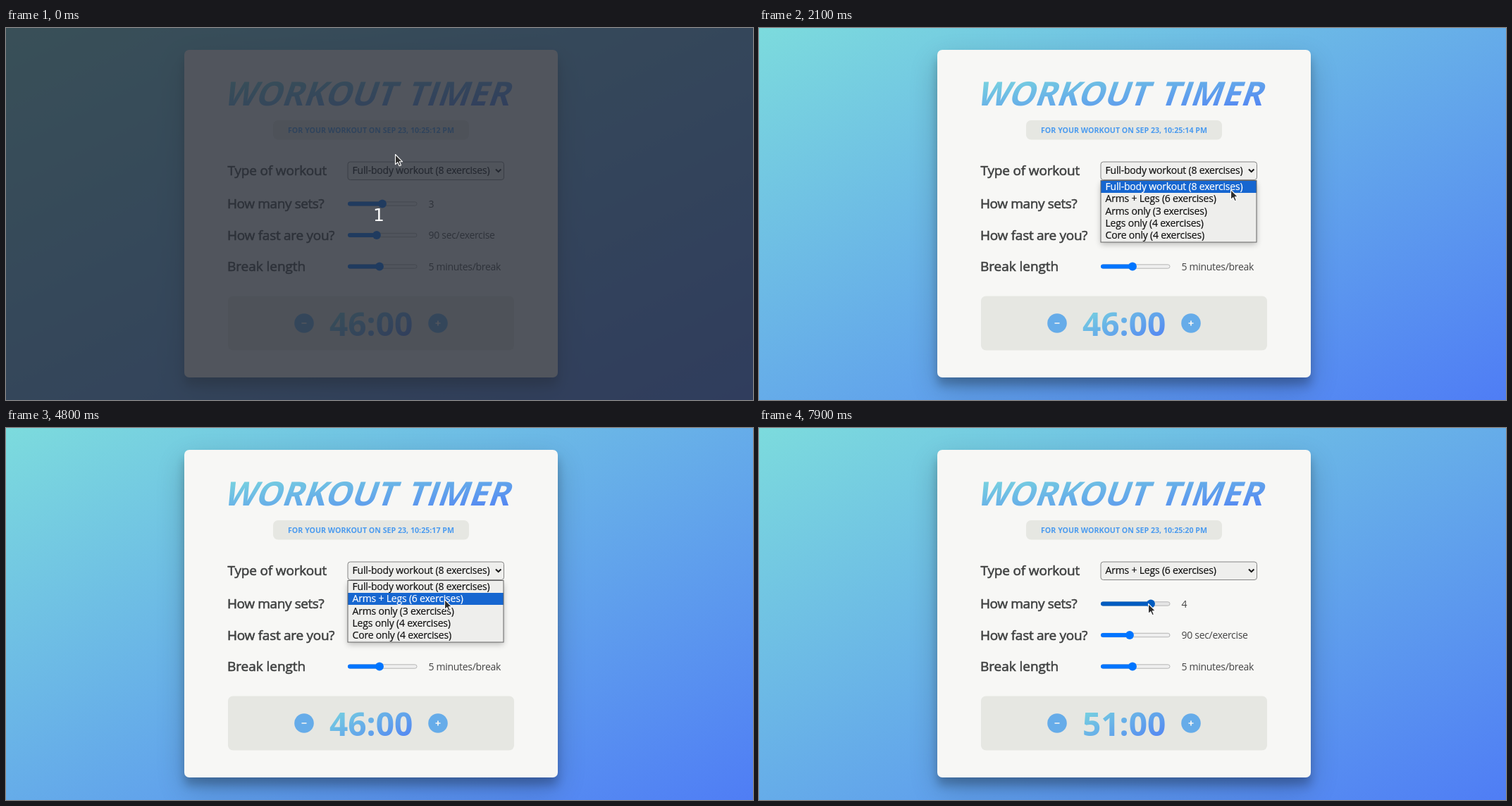
An HTML page for the animation above (8 s loop, 1060 by 528 pixels).

```html
<!DOCTYPE html>
<html lang="en">
<head>
<meta charset="utf-8">
<title>Workout timer</title>
<style>
  html, body { margin: 0; width: 100%; height: 100%; overflow: hidden; }
  svg { display: block; width: 1060px; height: 528px; font-family: "Open Sans", "Noto Sans", sans-serif; }
  text { white-space: pre; }
  .big { font-weight: 700; font-size: 47px; }
  .label { font-size: 19px; fill: #404242; stroke: #404242; stroke-width: .6px; }
  .value { font-size: 14px; fill: #444; letter-spacing: -.3px; }
  .option { font-size: 14px; letter-spacing: -.19px; }
  .date { font-weight: 700; font-size: 10.65px; fill: #4b9bef; text-anchor: middle; }
  .card { fill: #f7f7f5; filter: drop-shadow(0 0 0 transparent); }
</style>
</head>
<body>
<svg viewBox="0 0 1060 528">
  <defs>
    <linearGradient id="sky" x1="0" y1="0" x2="1" y2="1">
      <stop stop-color="#7cdbdd"/><stop offset="1" stop-color="#4f7df5"/>
    </linearGradient>
    <linearGradient id="titleInk" href="#sky" gradientUnits="userSpaceOnUse"
      gradientTransform="translate(309 -47) scale(406 60)"/>
    <linearGradient id="timeInk" href="#sky" gradientUnits="userSpaceOnUse"
      gradientTransform="translate(459 391) scale(118 58)"/>
    <filter id="wide" x="-30%" y="-30%" width="160%" height="160%"><feGaussianBlur stdDeviation="20"/></filter>
    <filter id="near" x="-30%" y="-30%" width="160%" height="160%"><feGaussianBlur stdDeviation="6.5"/></filter>
    <filter id="soft" x="-20%" y="-20%" width="140%" height="150%"><feGaussianBlur stdDeviation="4"/></filter>
  </defs>
  <rect width="1060" height="528" fill="url(#sky)"/>
  <rect x="253" y="47" width="530" height="465" rx="7" opacity=".2" filter="url(#wide)"/>
  <rect x="253" y="42" width="530" height="465" rx="7" opacity=".22" filter="url(#near)"/>
  <rect x="253" y="31" width="530" height="465" rx="7" fill="#f7f7f5"/>
  <g class="big" fill="url(#titleInk)" transform="translate(0 110) skewX(-19)">
    <text x="307.5" letter-spacing="-.1">WORKOUT</text>
    <text x="567" letter-spacing=".4">TIMER</text>
  </g>
  <rect x="379" y="131" width="278" height="27.5" rx="7" fill="#e6e7e2"/>
  <g class="label">
    <text x="314.5" y="209" letter-spacing="-.18">Type of workout</text>
    <text x="314" y="256" letter-spacing="-.4">How many sets?</text>
    <text x="314" y="301" letter-spacing="-.28">How fast are you?</text>
    <text x="314" y="345" letter-spacing="-.05">Break length</text>
  </g>
  <rect x="315" y="380.5" width="406" height="77" rx="7" fill="#e6e7e2"/>
  <g fill="#66ace9"><circle cx="423" cy="419" r="13.8"/><circle cx="613" cy="419" r="13.8"/></g>
  <path d="M419.5 419h7M609.5 419h7M613 415.5v7" stroke="#f7f7f5" stroke-width="1.7"/>
  <g id="live"></g>
</svg>
<script>
const DURATION = 8000, STEP = 100;
const OPTIONS = ["Full-body workout (8 exercises)", "Arms + Legs (6 exercises)",
  "Arms only (3 exercises)", "Legs only (4 exercises)", "Core only (4 exercises)"];
const LIST_TOP = 216.9, ROW = 17.4;

// Pointer path: time, x, y
const PATH = [
  [600, 552, 179], [800, 400, 95], [900, 326, 40], [1000, 400, 4], [1200, 620, 110], [1400, 697, 207],
  [1900, 697, 207], [2200, 655, 240], [2500, 640, 272.5], [2800, 640, 294], [2900, 640, 295],
  [3100, 640, 295], [3500, 645, 232], [3800, 635, 287], [4400, 635, 287], [4800, 622, 243],
  [5700, 622, 243], [6300, 566, 275], [6700, 566, 275], [7000, 534, 249], [7400, 552, 249]];

function pointerAt(t) {
  const next = PATH.findIndex(p => p[0] > t);
  if (next === 0) return PATH[0].slice(1);
  if (next < 0) return PATH.at(-1).slice(1);
  const [t0, x0, y0] = PATH[next - 1], [t1, x1, y1] = PATH[next];
  const k = (t - t0) / (t1 - t0);
  return [x0 + (x1 - x0) * k, y0 + (y1 - y0) * k];
}

const text = (cls, x, y, str, fill = "") =>
  `<text class="${cls}" x="${x}" y="${y}"${fill && ` fill="${fill}" stroke="${fill}" stroke-width=".2"`}>${str}</text>`;

const slider = (y, knob, label, hover) => {
  const color = hover ? "#005cc0" : "#0075ff";
  return `<rect x="485.5" y="${y - 2.7}" width="97.5" height="5.4" rx="2.7" fill="${hover ? "#e5e5e5" : "#efefef"}" stroke="#b5b5b5"/>
    <rect x="485" y="${y - 3}" width="${knob - 485}" height="6" rx="3" fill="${color}"/>
    <circle cx="${knob}" cy="${y}" r="5.9" fill="${color}"/>` + text("value", 599.5, y + 5.2, label);
};

const select = (label, focused) =>
  `<rect x="485" y="190" width="221.5" height="25.5" rx="3.5" fill="#efefed"
    stroke="${focused ? "#111" : "#858585"}" stroke-width="${focused ? 2 : 1}"/>
  <path d="M695 200.5l3.7 3.7l3.7 -3.7" fill="none" stroke="#111" stroke-width="2"/>`
  + text("option", 491.5, 207.2, label, "#111");

function dropdown(pointerY) {
  const active = Math.max(0, Math.min(4, Math.floor((pointerY - LIST_TOP) / ROW)));
  return `<rect x="485" y="221" width="221" height="86" opacity=".25" filter="url(#soft)"/>
    <rect x="485" y="216.5" width="221" height="87.5" fill="#eeeeec"/>
    <rect x="485" y="${Math.round(LIST_TOP + active * ROW)}" width="221" height="17" fill="#1666d0"/>
    <rect x="485" y="216.5" width="221" height="87.5" fill="none" stroke="#666"/>`
    + OPTIONS.map((o, i) => text("option", 491.5, 229.7 + i * ROW, o, i === active ? "#fff" : "#111")).join("");
}

const pointer = (x, y) =>
  `<path transform="translate(${x} ${y})" d="M.5 .5v14.2l3.3-3l2.3 5.1l2.4-1.1l-2.2-4.9h4.4z"
    fill="#2d2d2d" stroke="#fff" stroke-width="1.1" stroke-linejoin="round"/>`;

function scene(t) {
  const [x, y] = pointerAt(t);
  const second = 12 + Math.floor((t + 258) / 1008);
  const open = t >= 1500 && t < 5000;
  const chosen = t >= 5000 ? 1 : 0;
  const sets = t >= 7300 ? 4 : 3;
  const minutes = !chosen ? 46 : sets === 3 ? 37 : 51;
  return text("date", 518, 149, `FOR YOUR WORKOUT ON SEP 23, 10:25:${second} PM`)
    + select(OPTIONS[chosen], t >= 5000 && t < 7100)
    + slider(249.5, 534 + (sets - 3) * 22, sets, t >= 7000)
    + slider(294, 526, "90 sec/exercise")
    + slider(338.5, 530, "5 minutes/break")
    + `<text class="big" style="font-size:46px" x="459" y="437" fill="url(#timeInk)">${minutes}:00</text>`
    + (open ? dropdown(y) : "")
    + (t < 100 ? `<rect width="1060" height="528" fill="#292d37" opacity=".8"/>
      <text x="529" y="274" font-size="25" fill="#fff" text-anchor="middle" font-family="DejaVu Sans, sans-serif">1</text>` : "")
    + pointer(x, y);
}

const live = document.getElementById("live");
let shown = -1;
function draw() {
  const t = Math.floor(performance.now() % DURATION / STEP) * STEP;
  if (t !== shown) live.innerHTML = scene(shown = t);
  requestAnimationFrame(draw);
}
draw();
</script>
</body>
</html>
```
